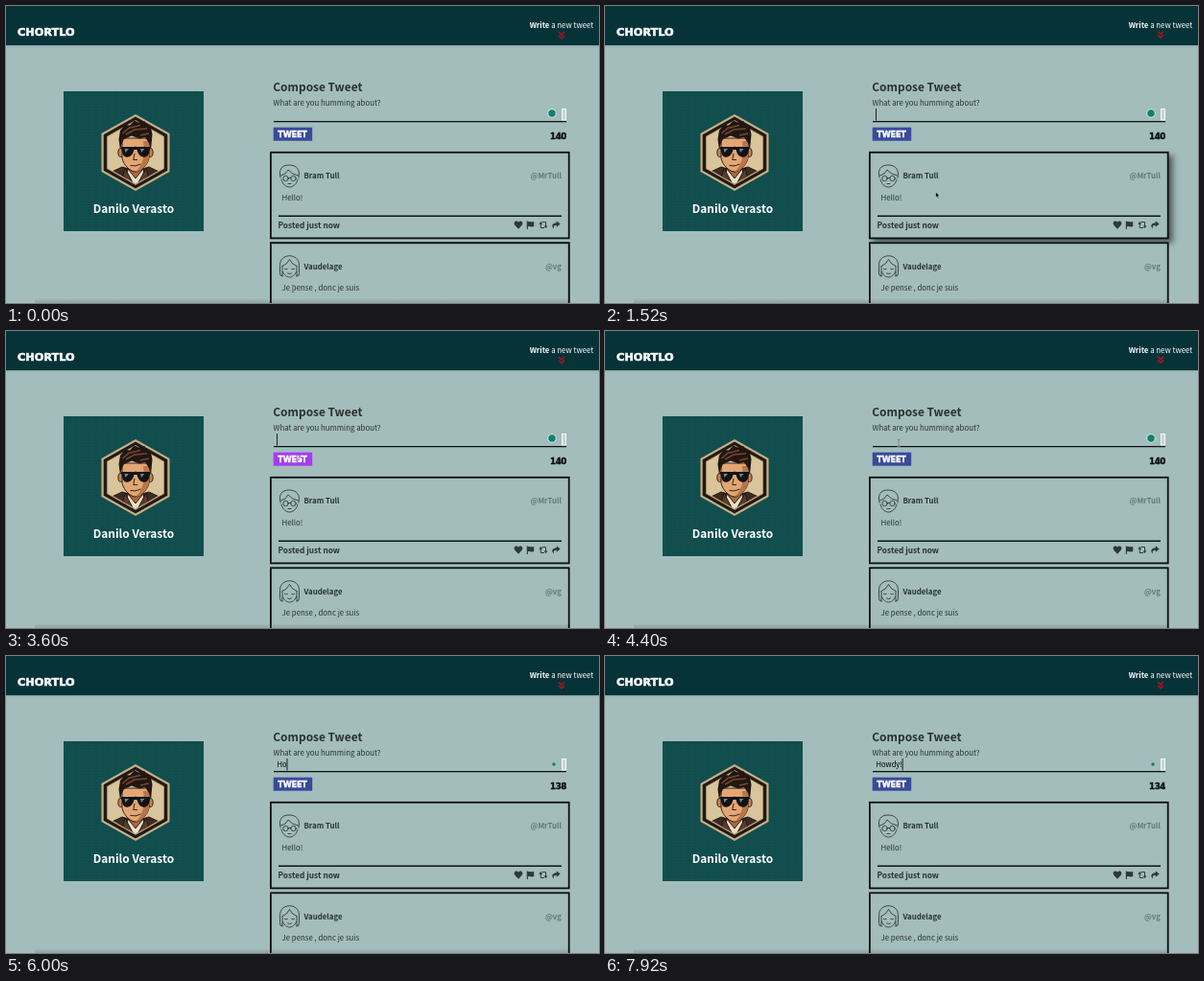
Write an HTML page that moves like this. It is 618 px wide and 310 px high and loops after 8000 ms.

```html
<!DOCTYPE html>
<html lang="en">
<head>
<meta charset="utf-8">
<title>Compose Tweet</title>
<style>
  html, body { margin: 0; width: 100%; height: 100%; overflow: hidden; background: #a2bdbb; }
  svg { display: block; width: 618px; height: 310px; }
  text { font-family: "Noto Sans CJK JP", "Noto Sans CJK SC", "Noto Sans CJK", "Open Sans", sans-serif; font-size: 7.85px; fill: #2a3030; white-space: pre; }
  .bold { font-weight: 700; }
  .big { font-size: 11.9px; font-weight: 700; }
  .block { font-family: "DejaVu Sans", sans-serif; font-weight: 700; stroke-width: .6; }
  .white { fill: #fff; stroke: #fff; }
  .line { fill: none; stroke: #2b3333; stroke-width: .85; stroke-linecap: round; stroke-linejoin: round; }
</style>
</head>
<body>
<svg viewBox="0 0 618 310">
  <defs>
    <linearGradient id="drop" x2="0" y2="1">
      <stop stop-color="#000" stop-opacity=".1"/><stop offset="1" stop-color="#000" stop-opacity="0"/>
    </linearGradient>
    <linearGradient id="rise" x2="0" y2="1">
      <stop stop-color="#000" stop-opacity="0"/><stop offset="1" stop-color="#000" stop-opacity=".13"/>
    </linearGradient>
    <pattern id="weave" width="7" height="3" patternUnits="userSpaceOnUse">
      <path d="M0 .5H4M3 2H7" stroke="#0b4344" stroke-width=".7" opacity=".55"/>
    </pattern>
    <clipPath id="hex"><path d="M135 120.500 163.500 136.700V169.300L135 185.500 106.500 169.300V136.700Z"/></clipPath>
    <g id="actions" fill="#2f3838">
      <path d="M534 232.800 530.500 229C528.600 226.700 530.300 224.500 532 224.600 533 224.600 533.700 225.200 534 225.800 534.300 225.200 535 224.600 536 224.600 537.700 224.500 539.400 226.700 537.500 229Z"/>
      <path d="M542.800 224.400H543.900V225.200C546 224.200 547.500 226 550.200 224.900V230C547.500 231.200 546 229.300 543.900 230.200V233H542.800Z"/>
      <path d="M557.300 227V231.500H561M558.700 225.500H562.500V230" fill="none" stroke="#2f3838"/>
      <path d="M555.300 227.700 557.300 225 559.300 227.700ZM560.500 229.400 562.500 232.100 564.500 229.400Z"/>
      <path d="M573.800 224.200 577.700 227.500 573.800 230.800V228.800C571.300 228.800 570.300 229.700 570.900 232.600 568.200 230.300 568.900 226.300 573.800 226.300Z"/>
    </g>
  </defs>

  <rect width="618" height="310" fill="#a2bdbb"/>
  <rect y="41" width="618" height="3" fill="url(#drop)"/>
  <rect width="618" height="41" fill="#063338"/>
  <text class="block white" x="12" y="30.500" style="font-size:11.300px">CHORTLO</text>
  <text x="545.700" y="23" style="fill:#fff"><tspan class="bold">Write</tspan> a new tweet</text>
  <path id="arrow" d="M576 27.200 579 30.200 582 27.200M576 30.800 579 33.800 582 30.800" fill="none" stroke="#98191f" stroke-width="1.700"/>

  <g id="profile">
    <rect x="60" y="89" width="146" height="146" fill="#124f4f"/>
    <rect x="60" y="89" width="146" height="146" fill="url(#weave)"/>
    <path d="M135 113 170.500 133V173L135 193 99.500 173V133Z" fill="#c9ae83"/>
    <path d="M135 115.500 168.300 134.300V171.700L135 190.500 101.700 171.700V134.300Z" fill="#1f1a17"/>
    <path d="M135 119.500 164.500 136.200V169.800L135 186.500 105.500 169.800V136.200Z" fill="#d9c59b" stroke="#b59668" stroke-width=".8"/>
    <g clip-path="url(#hex)" stroke="#1d1512" stroke-width=".9">
      <path d="M106 190V175L121 168 135 172 149 168 164 175V190Z" fill="#3d2b22"/>
      <path d="M128 160H142V173L135 181 128 173Z" fill="#a9683f"/>
      <path d="M127 170 135 180 143 170 146 190H124Z" fill="#ecdfc6"/>
      <path d="M124 169 134 188H119ZM146 169 136 188H151Z" fill="#5a3c2b"/>
      <ellipse cx="119.500" cy="153" rx="2.600" ry="4.500" fill="#c88556"/>
      <ellipse cx="150.500" cy="153" rx="2.600" ry="4.500" fill="#c88556"/>
      <path d="M121 138H149V159C147 167 140 173 135 173 130 173 123 167 121 159Z" fill="#e3a673"/>
      <path d="M143 141H149V159C147 167 140 173 135 173 143 166 145 156 143 141Z" fill="#b9754a" stroke="none"/>
      <path d="M134 154 132.800 160.500H137M129.500 166.500Q135 168 140.500 165" fill="none"/>
    </g>
    <path d="M119 150 117.500 139 119 130 124 124 129 124.500 134 119.500 138 121.500 145 120 143.500 123 151 127 152.500 134 151 150 149 143 145 137 139 138.500 131 135.500 123 139 121 143Z" fill="#211612"/>
    <path d="M121.500 133 128 127.500 140 124.500M125 134 134 129 147 128M140 135 149 133" fill="none" stroke="#744730" stroke-width="1.500"/>
    <path d="M120 147H134Q135 146 136 147H150.500L149 154Q147 158.500 142.500 157.500 138 156.500 136.500 150H133.500Q132 156.500 127.500 157.500 123 158.500 121.500 154Z" fill="#111316"/>
    <path d="M123.500 149 128 149 124.500 153ZM140 149H144.500L141 153Z" fill="#77818a"/>
    <text class="big" x="133" y="216" text-anchor="middle" style="fill:#fff">Danilo Verasto</text>
  </g>

  <text class="big" x="278.300" y="89.300">Compose Tweet</text>
  <text x="278.500" y="104">What are you humming about?</text>
  <path d="M279 120.600H584" stroke="#0c1212" stroke-width="1.400"/>
  <text id="draft" x="282.500" y="116" style="font-size:7.600px;fill:#000;font-weight:500"></text>
  <rect id="caret" y="107" width=".9" height="12.500" fill="#111"/>
  <circle id="badge" fill="#10806f"/>
  <rect x="579.500" y="107.500" width="4" height="11.500" fill="#cbd5d4" stroke="#f7f9f9"/>
  <rect id="button" x="278.700" y="126.700" width="40.500" height="14"/>
  <text class="block white" x="283.300" y="136.900" style="font-size:8.200px;letter-spacing:-.2px;stroke-width:.4">TWEET</text>
  <text id="count" class="block" x="567" y="139" style="font-size:8.700px;letter-spacing:-.4px;fill:#0c1212;stroke:#0c1212;stroke-width:.4"></text>

  <g id="cards"></g>
  <rect x="30" y="305" width="558" height="5" fill="url(#rise)"/>
  <g id="cursor">
    <path d="M-1.500-4Q0-4 0-3 0-4 1.500-4M0-3V3M-1.500 4Q0 4 0 3 0 4 1.500 4" fill="none" stroke="#fff" stroke-width="1.400" opacity=".55"/>
    <path d="M-1.500-4Q0-4 0-3 0-4 1.500-4M0-3V3M-1.500 4Q0 4 0 3 0 4 1.500 4" fill="none" stroke="#3c4646" stroke-width=".7"/>
    <path d="M-1.500-3V3L0 1.700 1 4 2.200 3.500 1.200 1.300H3Z" fill="#0b0b0b" stroke="#e8eeee" stroke-width=".5"/>
    <path d="M-.8-4H.4V-1L3-.4V2L2 4.500H-1.500L-3 1.500-2.200.8-.8 2Z" fill="#fff" stroke="#5b2f86" stroke-width=".6"/>
  </g>
</svg>
<script>
const LOOP = 8000;
const $ = id => document.getElementById(id);

const faces = [
  `<path d="M286 179C284 171 287 166 295 166S307 171 305 179M286.500 177Q292 176 294 171 298 176 304.500 177M287 181C288 186 292 189 295.500 189S303 186 304 181"/>
   <circle cx="291.500" cy="180" r="2.700"/><circle cx="299.500" cy="180" r="2.700"/>
   <path d="M294.200 179.500H296.800M294 185.500H297"/>`,
  `<path d="M288 187.500Q285 187.500 285.500 184V176C285.500 163 305.500 163 305.500 176V184Q306 187.500 303 187.500M288 187.500V177M303 187.500V177M288 177Q293 175.500 295.500 170 298 175.500 303 177M288.500 183C290 187 293 188.500 295.500 188.500S301 187 302.500 183"/>
   <path d="M290.500 180Q292 181 293.300 180M297.700 180Q299 181 300.500 180M293.500 184.500Q295.500 186 297.500 184.500"/>`
];
const cards = [
  { top: 152, name: "Bram Tull", tag: "@MrTull", text: "Hello!" },
  { top: 246.5, name: "Vaudelage", tag: "@vg", text: "Je pense , donc je suis" }
];
$("cards").innerHTML = cards.map((c, i) => `
  <g transform="translate(0 ${c.top - 152})">
    <rect class="frame" x="275.900" y="152.800" width="310.800" height="89.600" fill="#a2bdbb" stroke="#0a0f0f" stroke-width="1.800"/>
    <g class="line">${faces[i]}</g>
    <text class="bold" x="310.500" y="180">${c.name}</text>
    <text class="bold" x="579" y="180" text-anchor="end" style="fill:#657674">${c.tag}</text>
    <text x="287.500" y="202.500">${c.text}</text>
    <path d="M284 219.200H579" stroke="#0c1212" stroke-width="1.600"/>
    <text class="bold" x="283.500" y="232" style="font-size:8.300px">Posted just now</text>
    <use href="#actions"/>
  </g>`).join("");
const frames = document.querySelectorAll(".frame");
const pointers = $("cursor").children;

// time, x, y
const path = [
  [0, 299, 295], [250, 299, 295], [800, 332, 214], [1300, 346, 197], [1800, 346, 197],
  [2300, 174, 179], [2560, 163, 177], [2800, 163, 177], [3300, 300, 135], [3600, 306, 133],
  [3950, 306, 133], [4400, 306, 117], [5120, 306, 116], [LOOP, 306, 116]
];
// time, lift, x scale, y scale
const bounce = [
  [0, 0, 1, 1], [100, 0, 1.1, .9], [300, -5, .9, 1.1], [500, 0, 1.05, .95],
  [570, -1.2, 1, 1], [640, 0, 1, 1], [1000, 0, 1, 1]
];
const word = "Howdy!";
const keys = [5760, 5920, 6160, 7200, 7360, 7600];

const smooth = u => u * u * (3 - 2 * u);
const settle = u => 1 - (1 - u) ** 3;

function at(steps, t, ease) {
  const i = steps.findIndex(s => s[0] > t);
  const a = steps[i - 1], b = steps[i];
  const u = ease((t - a[0]) / (b[0] - a[0]));
  return a.slice(1).map((v, k) => v + (b[k + 1] - v) * u);
}

function inside([x, y], l, top, r, b) {
  return x >= l && x < r && y >= top && y < b;
}

// The shadow follows the pointer with a short transition.
function lift(el, t, ...box) {
  let n = 0;
  for (let back = 0; back < 240; back += 20)
    if (t >= back && inside(at(path, t - back, smooth), ...box)) n++;
  const k = n / 12;
  el.style.filter = n ? `drop-shadow(${4 * k}px ${4 * k}px ${3 * k}px rgba(0,0,0,.55))` : "";
}

function draw(t) {
  const pos = at(path, t, smooth);
  const typed = keys.filter(k => k <= t).length;

  const onButton = inside(pos, 279, 127, 319, 141);
  $("button").setAttribute("fill", onButton ? "#a63cf2" : "#394a9b");
  lift($("profile"), t, 60, 89, 206, 235);
  cards.forEach((c, i) => lift(frames[i], t, 275, c.top, 588, c.top + 91));

  const onText = inside(pos, 279, 106, 579, 121) || inside(pos, 284, 289, 370, 301);
  const kind = onButton ? 3 : onText ? 1 : 2;
  [...pointers].forEach((p, i) =>
    p.style.display = i === kind || (i === 0 && kind === 1) ? "" : "none");
  $("cursor").setAttribute("transform", `translate(${pos})`);
  $("cursor").style.display = typed ? "none" : "";

  $("draft").textContent = word.slice(0, typed);
  $("count").textContent = 140 - typed;
  const since = t - (typed ? keys[typed - 1] : -500);
  $("caret").style.display = since % 1000 < 500 ? "" : "none";
  $("caret").setAttribute("x", 282 + (typed ? $("draft").getComputedTextLength() + .4 : 0));

  const badge = $("badge");
  badge.setAttribute("cx", typed ? 571 : 569);
  badge.setAttribute("cy", typed ? 113 : 112);
  badge.setAttribute("r", typed ? 1.7 : 4.3);
  badge.setAttribute("stroke", typed ? "none" : "#dce8e6");

  const [rise, sx, sy] = at(bounce, t % 1000, settle);
  $("arrow").setAttribute("transform",
    `translate(579 ${30.5 + rise}) scale(${sx} ${sy}) translate(-579 -30.500)`);
}

const start = performance.now();
function tick() {
  draw((performance.now() - start) % LOOP);
  requestAnimationFrame(tick);
}
tick();
</script>
</body>
</html>
```
